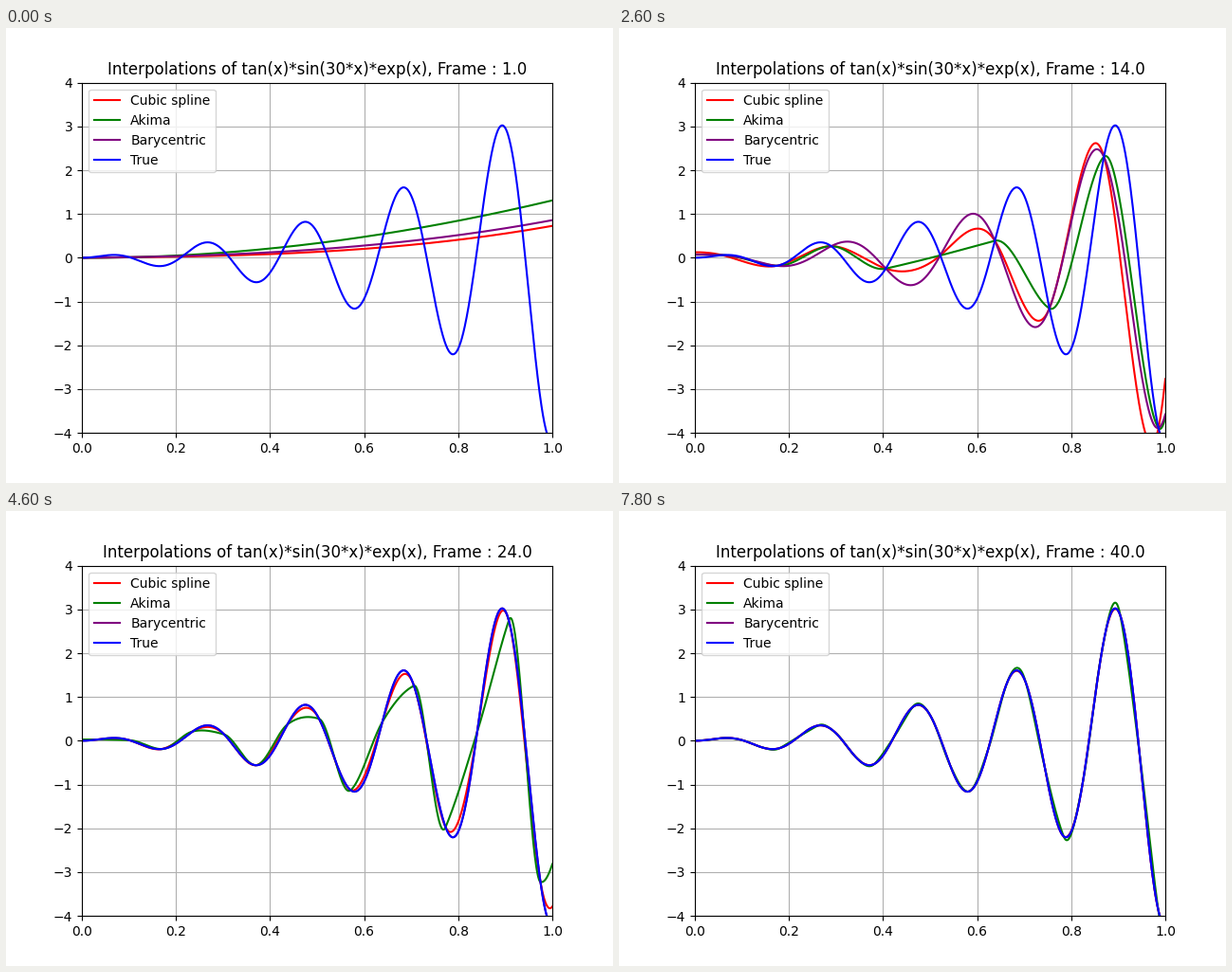
A matplotlib script that plays this animation: 640 by 480 pixels, repeating every 8 s.

```python
import math

import numpy as np
import matplotlib.pyplot as plt
from matplotlib.animation import FuncAnimation

STEPS = 40
INTERVAL = 200
LIMIT = 4


def true_func(x):
    return np.tan(x) * np.sin(30 * x) * np.exp(x)


def hermite(xn, yn, slopes, x):
    """Piecewise cubic through evenly spaced nodes with given slopes."""
    h = xn[1] - xn[0]
    i = np.clip(((x - xn[0]) / h).astype(int), 0, len(xn) - 2)
    t = (x - xn[i]) / h
    return ((1 + 2 * t) * (1 - t) ** 2 * yn[i]
            + t * (1 - t) ** 2 * h * slopes[i]
            + t ** 2 * (3 - 2 * t) * yn[i + 1]
            + t ** 2 * (t - 1) * h * slopes[i + 1])


def cubic_spline(xn, yn, x):
    """Cubic spline with not-a-knot ends."""
    n = len(xn)
    m = np.diff(yn) / np.diff(xn)
    a = 4 * np.eye(n) + np.eye(n, k=1) + np.eye(n, k=-1)
    b = np.empty(n)
    b[1:-1] = 3 * (m[:-1] + m[1:])
    a[0, :2] = 1, 2
    a[-1, -2:] = 2, 1
    b[0] = (5 * m[0] + m[1]) / 2
    b[-1] = (5 * m[-1] + m[-2]) / 2
    return hermite(xn, yn, np.linalg.solve(a, b), x)


def akima(xn, yn, x):
    m = np.diff(yn) / np.diff(xn)
    lo = 2 * m[0] - m[1]
    hi = 2 * m[-1] - m[-2]
    m = np.concatenate([[2 * lo - m[0], lo], m, [hi, 2 * hi - m[-1]]])
    dm = np.abs(np.diff(m))
    w1, w2 = dm[2:], dm[:-2]
    total = w1 + w2
    slopes = (m[3:] + m[:-3]) / 2
    ok = total > 1e-9 * total.max()
    slopes[ok] = ((w1 * m[1:-2] + w2 * m[2:-1])[ok]) / total[ok]
    return hermite(xn, yn, slopes, x)


def barycentric(xn, yn, x):
    n = len(xn)
    mid = math.comb(n - 1, (n - 1) // 2)
    w = np.array([(-1) ** j * (math.comb(n - 1, j) / mid) for j in range(n)])
    diff = x[:, None] - xn
    diff[diff == 0] = 1e-15
    c = w / diff
    return c @ yn / c.sum(axis=1)


METHODS = [
    ("Cubic spline", "red", cubic_spline),
    ("Akima", "green", akima),
    ("Barycentric", "purple", barycentric),
]

x = np.linspace(0, 1, 1000)
fig, ax = plt.subplots(figsize=(6.4, 4.8), dpi=100)
lines = [ax.plot([], [], color=color, label=label)[0]
         for label, color, _ in METHODS]
ax.plot(x, true_func(x), color="blue", label="True")
ax.set_xlim(0, 1)
ax.set_ylim(-4, 4)
ax.grid(True)
ax.legend(loc="upper left")
title = ax.set_title("")


def update(i):
    step = i + 1
    xn = np.linspace(-LIMIT, LIMIT, 5 * step)
    yn = true_func(xn)
    for line, (_, _, method) in zip(lines, METHODS):
        line.set_data(x, method(xn, yn, x))
    title.set_text("Interpolations of tan(x)*sin(30*x)*exp(x), "
                   f"Frame : {step:.1f}")
    return [*lines, title]


anim = FuncAnimation(fig, update, frames=STEPS, interval=INTERVAL,
                     repeat=True, repeat_delay=0, blit=False)
plt.show()
```
